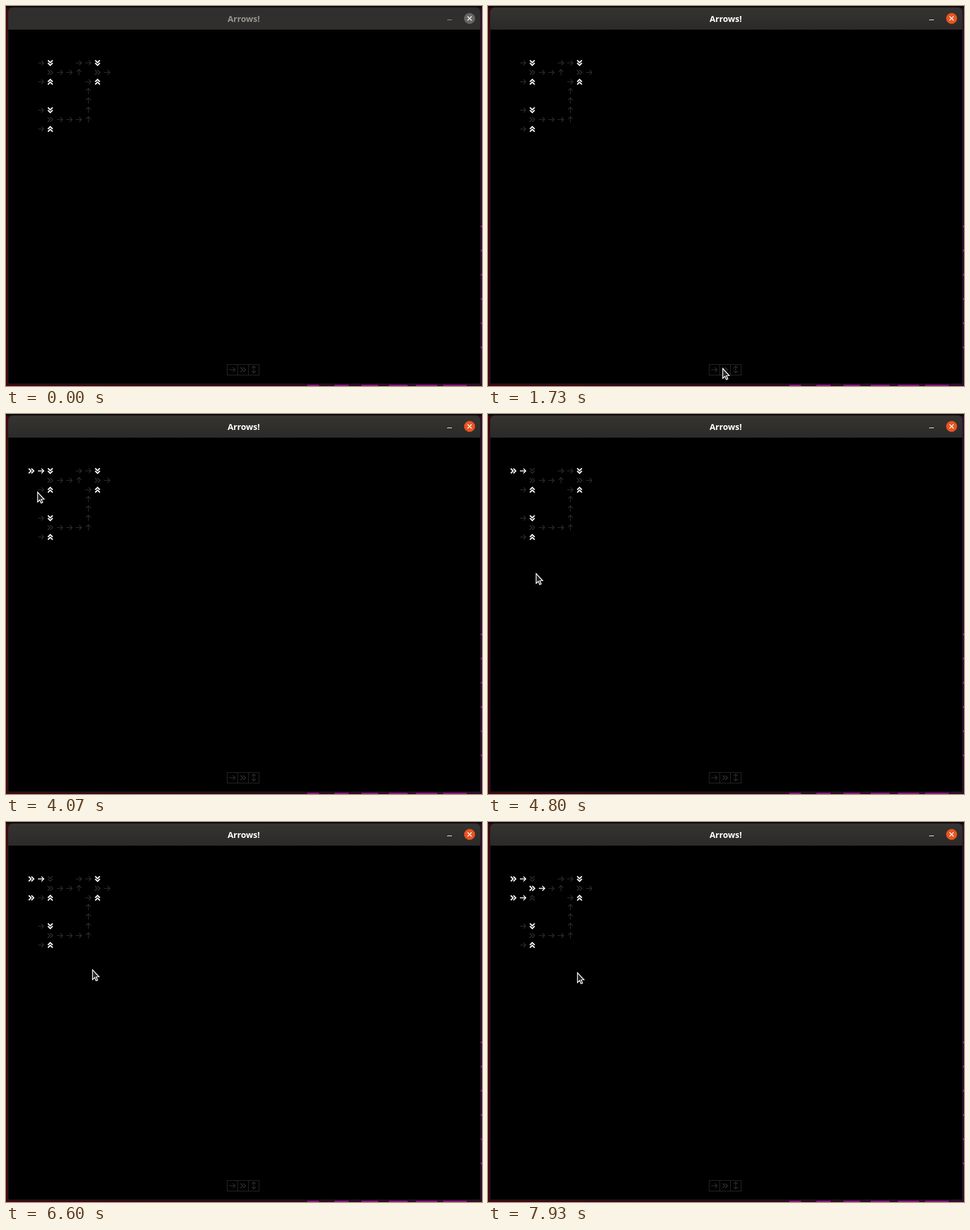
Write an HTML page with a canvas that moves like this. It is 806x644 px and loops after 8 s.

```html
<!DOCTYPE html>
<html lang="en">
<head>
<meta charset="utf-8">
<title>Arrows!</title>
<style>
  html, body { margin: 0; width: 100%; height: 100%; overflow: hidden; background: #000; }
  canvas { display: block; width: 100%; height: 100%; }
</style>
</head>
<body>
<canvas width="806" height="644"></canvas>
<script>
const LOOP = 8000, STEP = 200 / 3, TICK = 500;
const DIM = '#302f31';
const ctx = document.querySelector('canvas').getContext('2d');

// S source, > ^ wires, V A inverting gates, D output of the gates around it
const board = [
  'S>V..>>V.',
  '..D>>^.D>',
  'S>A...>A.',
  '......^..',
  '......^..',
  '.>V...^..',
  '..D>>>^..',
  '.>A......'
];
const placedAt = { 0: 3400, 2: 6130 };
const quarterTurns = { V: 1, '^': 3, A: 3 };

// Each pointer move: leave, arrive, x, y
const moves = [
  [730, 1690, 397, 615], [2070, 3130, 44, 91], [3800, 4670, 81, 271],
  [4800, 5530, 43, 141], [5530, 5870, 42, 128], [6130, 6600, 146, 251],
  [6600, 6870, 151, 256]
];

// Time at which the signal reaches a cell
function reachedAt(col, row) {
  const kind = board[row]?.[col];
  if (!kind || kind === '.') return Infinity;
  if (kind === 'S') return placedAt[row];
  if (kind === 'D') return Math.max(reachedAt(col, row - 1), reachedAt(col, row + 1));
  const below = kind === '^' ? reachedAt(col, row + 1) : Infinity;
  return Math.min(reachedAt(col - 1, row), below) + TICK;
}

function line(points, close) {
  ctx.beginPath();
  points.forEach(([x, y]) => ctx.lineTo(x, y));
  if (close) ctx.closePath();
  ctx.stroke();
}

function glyph(kind, x, y, lit) {
  ctx.save();
  ctx.translate(x, y + .5);
  ctx.rotate((quarterTurns[kind] || 0) * Math.PI / 2);
  ctx.strokeStyle = lit ? '#fff' : DIM;
  if (kind === '>' || kind === '^') {
    if (kind === '^') ctx.translate(0, .5);
    ctx.lineWidth = lit ? 1.6 : 1.1;
    line([[-5, 0], [5, 0]]);
    line([[1, -4], [5, 0], [1, 4]]);
  } else {
    ctx.lineWidth = lit ? 2 : 1.5;
    for (const dx of [-4.5, 0]) line([[dx, -4], [dx + 4, 0], [dx, 4]]);
  }
  ctx.restore();
}

function gradient(x, y, ...colors) {
  const g = ctx.createLinearGradient(0, y ? 3 : 0, x, y);
  colors.forEach((c, i) => g.addColorStop(i / (colors.length - 1), c));
  return g;
}

function desktop() {
  ctx.fillStyle = gradient(806, 0, '#42040f', '#2a0717', '#300a2c');
  ctx.fillRect(0, 0, 806, 644);
  ctx.fillStyle = '#0b090b';
  ctx.fillRect(0, 0, 806, 3);
  ctx.fillStyle = '#96168c';
  for (let i = 0; i < 6; i++) {
    ctx.fillRect(804, 372 + 41 * i, 2, 3);
    ctx.fillRect(510 + 46 * i, 642, 20 + 4 * i, 2);
  }
}

function frame(active) {
  desktop();
  ctx.fillStyle = '#000';
  ctx.fillRect(4, 40, 799, 600);
  ctx.fillStyle = active ? gradient(0, 40, '#353431', '#2b2a28') : '#302f2e';
  ctx.beginPath();
  ctx.roundRect(4, 3, 799, 37, [7, 7, 0, 0]);
  ctx.fill();
  ctx.strokeStyle = '#232124';
  ctx.lineWidth = 1;
  ctx.beginPath();
  ctx.roundRect(3.5, 2.5, 800, 638, [7, 7, 0, 0]);
  ctx.stroke();

  ctx.fillStyle = active ? '#fff' : '#97958f';
  ctx.font = '700 14.3px "Open Sans", sans-serif';
  ctx.textAlign = 'center';
  ctx.fillText('Arrows!', 402.5, 27);
  ctx.fillRect(747, 23, 8, 1);

  ctx.fillStyle = active ? '#e95420' : '#686663';
  ctx.beginPath();
  ctx.arc(785, 21, 9.3, 0, 7);
  ctx.fill();
  ctx.strokeStyle = '#fff';
  ctx.lineWidth = 1.5;
  line([[781.5, 17.5], [788.5, 24.5]]);
  line([[788.5, 17.5], [781.5, 24.5]]);
}

function toolbar() {
  ctx.lineWidth = 1;
  ctx.strokeStyle = '#2a292a';
  for (let i = 0; i < 3; i++) ctx.strokeRect(374.5 + 18 * i, 607.5, 18, 18);
  glyph('>', 383, 616);
  glyph('D', 401.5, 616);
  ctx.strokeStyle = DIM;
  ctx.lineWidth = 1.1;
  line([[419.5, 610], [419.5, 622]]);
  for (const dir of [-1, 1]) {
    const tip = 616 + 6 * dir;
    line([[416, tip - 3.5 * dir], [419.5, tip], [423, tip - 3.5 * dir]]);
  }
}

function cells(t) {
  board.forEach((text, row) => [...text].forEach((kind, col) => {
    const reached = t >= reachedAt(col, row);
    if (kind === '.' || kind === 'S' && !reached) return;
    const inverts = kind === 'V' || kind === 'A';
    glyph(kind, 43 + 16 * col, 96 + 16 * row, inverts !== reached);
  }));
}

function pointer(t) {
  if (t < moves[0][0]) return;
  let x = 806, y = 400;
  for (const [leave, arrive, toX, toY] of moves) {
    const k = Math.min(1, Math.max(0, (t - leave) / (arrive - leave)));
    const eased = k * k * (3 - 2 * k);
    x += (toX - x) * eased;
    y += (toY - y) * eased;
  }
  ctx.save();
  ctx.translate(Math.round(x) + .5, Math.round(y) - .5);
  ctx.fillStyle = '#2b2a2b';
  ctx.strokeStyle = '#fff';
  ctx.lineWidth = 1.2;
  line([[0, 0], [0, 16.5], [3.7, 13], [6, 18.5], [8.5, 17.5], [6.2, 12], [11, 12]], true);
  ctx.fill();
  ctx.stroke();
  ctx.restore();
}

const start = performance.now();

function draw() {
  const elapsed = (performance.now() - start) % LOOP;
  const t = Math.floor((elapsed + 5) / STEP) * STEP + 5;
  frame(t > STEP);
  cells(t);
  toolbar();
  pointer(t);
  requestAnimationFrame(draw);
}
draw();
</script>
</body>
</html>
```
